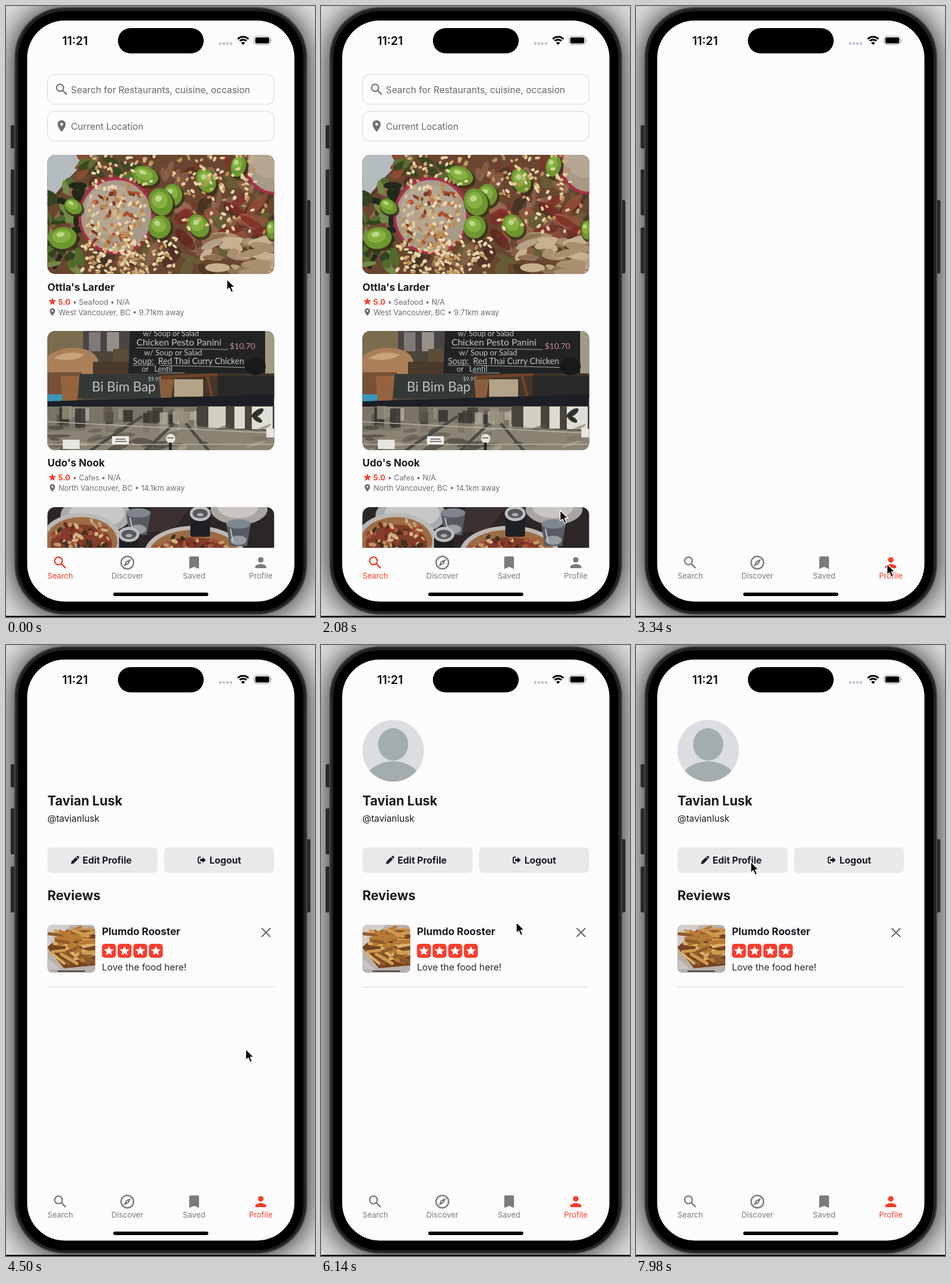
Animation, 533 px wide and 1051 px high, one loop 8 s. Source, as an HTML page:

```html
<!DOCTYPE html>
<html lang="en">
<head>
<meta charset="utf-8">
<title>Restaurant app</title>
<style>
  html, body { margin: 0; width: 100%; height: 100%; overflow: hidden; background: #dcdcda; }
  svg { display: block; width: 100vw; height: 100vh; }
  text { font-family: Inter, Roboto, sans-serif; white-space: pre; }
  .chalk { font-family: Lato, "Open Sans", sans-serif; }
</style>
</head>
<body>
<svg id="stage" viewBox="0 0 533 1051"></svg>
<script>
const DURATION = 8000, TAP = 3340, LOADED = 4180, AVATAR = 5900;
const INK = '#1b1a20', GREY = '#7b7a7d', RED = '#f53f2a', PAPER = '#fcfcfd';

let seed = 7;
const rand = (min = 0, max = 1) => {
  seed = (seed * 16807) % 2147483647;
  return min + (max - min) * seed / 2147483647;
};
const pick = list => list[Math.floor(rand(0, list.length))];
const repeat = (n, make) => Array.from({ length: n }, (_, i) => make(i)).join('');

const rect = (x, y, w, h, fill, r = 0, more = '') =>
  `<rect x="${x}" y="${y}" width="${w}" height="${h}" rx="${r}" fill="${fill}" ${more}/>`;
const oval = (x, y, rx, ry, fill, angle = 0, more = '') =>
  `<ellipse cx="${x}" cy="${y}" rx="${rx}" ry="${ry}" fill="${fill}" transform="rotate(${angle} ${x} ${y})" ${more}/>`;
const path = (d, fill, more = '') => `<path d="${d}" fill="${fill}" ${more}/>`;
const line = (d, color, width, more = '') =>
  path(d, 'none', `stroke="${color}" stroke-width="${width}" ${more}`);
const text = (x, y, size, fill, str, weight = 400, more = '') =>
  `<text x="${x}" y="${y}" font-size="${size}" fill="${fill}" font-weight="${weight}" ${more}>${str}</text>`;
const at = (x, y, scale, body) => `<g transform="translate(${x} ${y}) scale(${scale})">${body}</g>`;

const star = (x, y, r, fill) => {
  const points = Array.from({ length: 10 }, (_, i) => {
    const d = i % 2 ? r * 0.43 : r, a = i * Math.PI / 5;
    return `${(x + d * Math.sin(a)).toFixed(2)},${(y - d * Math.cos(a)).toFixed(2)}`;
  });
  return `<polygon points="${points.join(' ')}" fill="${fill}"/>`;
};

// Icons are centred on the origin of a 24 unit grid.
const icons = {
  search: c => `<circle cx="-2.5" cy="-2.5" r="5.5" fill="none" stroke="${c}" stroke-width="2"/>` +
    line('M1.6 1.6L7.8 7.8', c, 2.2),
  compass: c => `<circle r="9" fill="none" stroke="${c}" stroke-width="2"/>` +
    path('M5.5-5.5L2 2-5.5 5.5-2-2zM0-1.1a1.1 1.1 0 1 0 .01 0z', c, 'fill-rule="evenodd"'),
  bookmark: c => path('M-5-9H5Q7-9 7-7V9L0 6-7 9V-7Q-7-9-5-9z', c),
  person: c => `<circle cy="-4" r="4" fill="${c}"/>` + path('M-8 8V6C-8 3.3-2.7 2 0 2S8 3.3 8 6V8z', c),
  pin: c => path('M0-10C-3.9-10-7-6.9-7-3 -7 2.3 0 10 0 10S7 2.3 7-3C7-6.9 3.9-10 0-10zM0-5.5a2.5 2.5 0 1 0 .01 0z', c, 'fill-rule="evenodd"'),
  pencil: c => path('M-7 7L-6 2.4 1.5-5 5 -1.5-2.4 6zM2.4-5.8L4-7.2Q5-7.8 6-7L7-6Q7.8-5 7.2-4L5.8-2.4z', c),
  logout: c => line('M-1.5-5H-4Q-6-5-6-3V3Q-6 5-4 5H-1.5', c, 2) +
    path('M-2.5-2H1.5V-5.2L7.3 0 1.5 5.2V2H-2.5z', c)
};

function photo(id, x, y, w, h, r, body) {
  return `<clipPath id="${id}">${rect(x, y, w, h, '#000', r)}</clipPath><g clip-path="url(#${id})">${body}</g>`;
}

function bean(x, y, rx, ry, angle) {
  return oval(x + 2, y + 3, rx + 2, ry + 2, '#33301a', angle, 'opacity=".8"') + oval(x, y, rx, ry, '#6c962f', angle) +
    oval(x - 2, y - 3, rx * 0.68, ry * 0.6, '#86b040', angle) + oval(x - 4, y - 6, rx * 0.3, ry * 0.22, '#bcd88a', angle);
}

function salad() {
  const tones = ['#4b2c20', '#70402f', '#936450', '#3f3622', '#66643a', '#7d362c', '#a07a5c'];
  const radish = (x, y, rx, ry) =>
    oval(x, y, rx, ry, '#a89a88', 0, 'stroke="#a8304a" stroke-width="5"') + oval(x - 6, y - 10, rx * 0.75, ry * 0.68, '#b9ab98', 0, 'opacity=".7"');
  const seeds = (n, x0, x1, y0, y1) => repeat(n, () =>
    oval(rand(x0, x1), rand(y0, y1), rand(3, 4.8), rand(2, 3), pick(['#e3cda0', '#cfae78', '#ead9b4', '#b98d58']), rand(0, 180)));
  return rect(71, 256, 392, 206, '#68462f') +
    repeat(170, () => oval(rand(72, 462), rand(256, 461), rand(6, 22), rand(4, 11), pick(tones), rand(0, 180), 'opacity=".7"')) +
    repeat(22, () => oval(rand(300, 455), rand(330, 410), rand(12, 26), rand(6, 12), pick(['#7d2b25', '#97503f', '#a9705c', '#5d211b']), rand(-50, 50), 'opacity=".75"')) +
    path('M71 256H152Q120 282 100 306T71 340z', '#b5bcc0') +
    repeat(38, () => oval(rand(75, 130), rand(305, 455), rand(8, 18), rand(3, 8), pick(['#33431f', '#526a2b', '#20281a', '#768947']), rand(0, 180))) +
    repeat(14, () => oval(rand(115, 225), rand(260, 295), rand(9, 18), rand(4, 8), pick(['#3b4722', '#5b6b31', '#8c4a31']), rand(0, 180))) +
    repeat(45, () => oval(rand(345, 460), rand(395, 460), rand(10, 26), rand(4, 8), pick(['#a98f6f', '#c6b08f', '#8f7254', '#b3a283']), rand(-50, 30))) +
    radish(462, 270, 48, 52) + radish(190, 361, 63, 64) +
    bean(240, 292, 23, 16, 20) + bean(287, 325, 17, 19, 0) + bean(267, 337, 20, 24, -25) +
    bean(265, 380, 19, 20, 30) + bean(332, 378, 17, 21, -35) + bean(345, 300, 16, 22, -25) +
    bean(98, 399, 24, 19, -8) + bean(116, 345, 16, 12, 30) + bean(401, 275, 13, 19, 15) + bean(459, 385, 10, 16, 0) +
    repeat(55, () => oval(rand(140, 238), rand(315, 415), rand(3, 7), rand(2, 4), pick(['#a9512f', '#c27c4a', '#7f3a26']), rand(0, 180))) +
    seeds(90, 140, 240, 325, 418) + seeds(85, 130, 235, 410, 461) + seeds(75, 285, 430, 256, 330) +
    seeds(60, 200, 300, 395, 461) + seeds(45, 150, 260, 256, 315) + seeds(30, 300, 450, 330, 390);
}

function cafe() {
  const chalk = (x, y, size, str, color = '#c3c7c2') => text(x, y, size, color, str, 400, 'class="chalk"');
  return rect(71, 558, 392, 207, '#4b443a') + rect(71, 558, 62, 60, '#7b6c4e') +
    rect(133, 558, 80, 36, '#4a4545') + rect(143, 561, 20, 33, '#807a78') + rect(174, 561, 21, 33, '#958f87') +
    rect(185, 590, 28, 46, '#5c4d38') +
    path('M71 603Q95 584 128 589T160 620L150 634H71z', '#ab7f58') + path('M82 606Q106 590 136 600Q115 614 82 606z', '#c9a47b') +
    rect(71, 630, 60, 47, '#775038') + rect(150, 612, 63, 24, '#4a3a2b') + path('M94 636H128L122 680H98z', '#95643e') +
    path('M214 558H447L452 636L211 632z', '#212325') + rect(447, 558, 16, 80, '#a09a86') +
    chalk(236, 568, 13, 'w/ Soup or Salad') + chalk(225, 584, 16, 'Chicken Pesto Panini') +
    chalk(386, 590, 14, '$10.70', '#d08a9b') + chalk(238, 601, 13.5, 'w/ Soup or Salad') +
    chalk(219, 616, 14.5, 'Soup:  Red Thai Curry Chicken') + chalk(234, 629, 13, 'or   Lentil') +
    line('M225 588L383 591M219 618H257M265 618L424 622M262 631H308', '#a9aca8', 1) +
    rect(250, 632, 213, 43, '#43352a') + rect(290, 642, 50, 30, '#b3a387') +
    line('M240 640L365 634M284 638L273 674M347 636L356 674', '#6f4326', 5) +
    rect(365, 636, 98, 39, '#2a2727') + oval(430, 620, 18, 15, '#17191b') +
    path('M127 633H266L262 675H124z', '#343938') + chalk(148, 663, 23, 'Bi Bim Bap', '#bfc2bd') + chalk(245, 645, 9, '$9.95') +
    path('M264 642H290L285 674H267z', '#8a5f3e') + rect(71, 668, 26, 13, '#3a98bc') +
    path('M71 680L462 668V690H71z', '#1c1f26') +
    rect(71, 689, 392, 76, '#7a7568') +
    repeat(26, () => rect(rand(74, 330), rand(688, 704), rand(6, 18), rand(12, 40), pick(['#3d3a34', '#b5b09e', '#5c5749', '#99947f', '#2f2e2c']), 0, 'opacity=".8"')) +
    rect(330, 688, 133, 42, '#48443d') + rect(349, 689, 30, 38, '#d2d0c3') + rect(394, 689, 18, 38, '#dcdbd0') +
    rect(424, 689, 36, 39, '#deded6') + oval(434, 700, 12, 5, '#2e332b', -35) + oval(434, 711, 9, 4, '#303329', 30) +
    path('M71 733L210 715L462 732V765H71z', '#8f8977', 'opacity=".75"') +
    repeat(30, () => oval(rand(80, 455), rand(725, 762), rand(8, 24), rand(2, 6), pick(['#5d594d', '#b3ad9a', '#7b7464', '#403e39']), rand(-25, 10), 'opacity=".6"')) +
    line('M145 765L235 706M240 765L290 718M350 765L310 718', '#4b4b46', 5) +
    line('M71 715L462 735M71 754H462', '#bab5a4', 1.5) +
    rect(98, 746, 29, 16, '#e6e6e1') + rect(183, 740, 29, 14, '#f0f0eb') + rect(449, 727, 14, 15, '#e6e5df') +
    `<circle cx="284" cy="744" r="8" fill="#e6e4dc"/>` + rect(281, 751, 5, 14, '#26282a') +
    line('M189 745H206M188 749H208M278 743H289', '#53544f', 1.5);
}

function pizzas() {
  const tones = ['#c0986a', '#6b2c20', '#3c3122', '#a8563a', '#8a3a28', '#d2b184'];
  const pizza = (x, y, rx, ry) => oval(x, y - 1, rx + 8, ry + 6, '#bbb8b5') + oval(x, y, rx, ry, '#9b6c44') +
    oval(x, y + 5, rx - 9, ry - 8, '#823c2a') +
    repeat(70, () => {
      const a = rand(0, Math.PI * 2), d = rand(0.1, 0.95);
      return oval(x + d * rx * Math.cos(a), y + d * ry * Math.sin(a), rand(3, 8), rand(2, 4), pick(tones), rand(0, 180));
    });
  const can = (x, y) => rect(x - 17, y, 34, 40, '#1f2023', 4) + oval(x, y, 18, 13, '#bcbdc0') +
    oval(x, y, 13, 8, '#55575a') + oval(x, y + 2, 6, 3, '#a9abae');
  const glass = (x, y) => path(`M${x - 21} ${y - 18}H${x + 21}L${x + 15} ${y + 20}H${x - 15}z`, '#565c62') +
    oval(x, y - 18, 21, 8, '#7e868c') + oval(x, y + 10, 14, 8, '#989fa3') +
    line(`M${x - 14} ${y - 10}L${x - 9} ${y + 14}`, '#c3c9ca', 2);
  return rect(71, 861, 392, 100, '#2c2627') + path('M250 861H320L285 905H240z', '#3d3031') +
    oval(155, 876, 61, 32, '#a9aaac') + oval(157, 873, 48, 24, '#c6c7c7') +
    oval(402, 866, 49, 26, '#a9a6a2') + oval(400, 862, 35, 19, '#c9c6c1') +
    pizza(130, 921, 62, 42) + pizza(325, 942, 78, 41) + glass(228, 890) + can(212, 909) + can(335, 873) + glass(401, 909);
}

function fries() {
  return rect(71, 481, 84, 83, '#bab0aa') + path('M71 481H112L86 507L71 522z', '#d4cecb') +
    path('M71 520L105 490L154 498V551L100 556z', '#754520') +
    repeat(46, () => {
      const x = rand(74, 138), y = rand(489, 542), a = rand(-0.4, 0.8), len = rand(17, 34);
      return line(`M${x} ${y}l${len * Math.cos(a)} ${len * Math.sin(a)}`, pick(['#b67a34', '#cf9a50', '#dcb069', '#8f5c2c']), rand(4, 7), 'stroke-linecap="round"');
    }) + path('M71 538L100 563H71z', '#c8c2c2') + rect(71, 558, 84, 6, '#b7b0ae') + rect(89, 560, 47, 2, '#3d3532');
}

function field(y, icon, label) {
  return rect(71.5, y, 391, 51, PAPER, 12, 'stroke="#d4d4d6" stroke-width="1"') +
    at(96, y + 25.5, icon === 'search' ? 1.1 : 1, icons[icon]('#716e76')) + text(112, y + 32, 15.8, '#69666f', label);
}

function listing(y, name, kind, place) {
  return text(71.5, y, 17.5, INK, name, 700) + star(80, y + 19, 7, RED) +
    text(90, y + 24, 13.3, RED, '5.0', 700) + text(115, y + 24, 12.8, '#706d70', `• ${kind} • N/A`) +
    at(80, y + 37, 0.66, icons.pin('#706d70')) + text(90.5, y + 42, 12.95, '#706d70', place);
}

function feed() {
  return field(118, 'search', 'Search for Restaurants, cuisine, occasion') + field(181, 'pin', 'Current Location') +
    photo('dish', 71.5, 256, 391, 205, 13, salad()) +
    listing(489.5, "Ottla's Larder", 'Seafood', 'West Vancouver, BC • 9.71km away') +
    photo('counter', 71.5, 559, 391, 205, 13, cafe()) +
    listing(792, "Udo's Nook", 'Cafes', 'North Vancouver, BC • 14.1km away') +
    photo('table', 71.5, 862, 391, 100, 13, pizzas()) + rect(60, 932, 415, 55, PAPER);
}

function profile() {
  const button = (x, icon, iconX, label, labelX) => rect(x, 348, 190, 44, '#e9e8ea', 8) +
    at(iconX, 370, 0.98, icons[icon](INK)) + text(labelX, 376, 16, INK, label, 700);
  return text(71.5, 276, 22.3, INK, 'Tavian Lusk', 700) + text(71.5, 304, 15.7, INK, '@tavianlusk') +
    button(71.5, 'pencil', 119, 'Edit Profile', 132) + button(272.5, 'logout', 337.5, 'Logout', 351) +
    text(71.5, 439, 22.4, INK, 'Reviews', 700) +
    photo('meal', 71.5, 481.5, 82.5, 82, 8, fries()) +
    text(165.5, 499, 17.5, INK, 'Plumdo Rooster', 700) +
    repeat(4, i => rect(165.5 + i * 27, 514, 24, 24, '#fa3d2d', 5) + star(177.5 + i * 27, 526.5, 9, '#fff')) +
    text(165.5, 559.5, 15.9, '#2b292e', 'Love the food here!') +
    line('M441 487L456 502M456 487L441 502', '#6c6a6e', 2.3) + rect(71.5, 587.5, 391, 1, '#d4d3d8');
}

function avatar() {
  return photo('face', 71.5, 129, 106, 106, 53, rect(71, 129, 107, 107, '#dcdde1') +
    oval(124.5, 171, 26, 28, '#a4adad') + oval(124.5, 236, 48, 36, '#a4adad'));
}

function tabs(active) {
  const items = [['Search', 'search', 93.5], ['Discover', 'compass', 209.3], ['Saved', 'bookmark', 324.5], ['Profile', 'person', 439.5]];
  return items.map(([label, icon, x]) => {
    const color = label === active ? RED : GREY;
    return at(x, 957.5, 1.2, icons[icon](color)) + text(x, 985, 13.3, color, label, 400, 'text-anchor="middle"');
  }).join('');
}

function phone() {
  return `<filter id="soft" x="-30%" y="-30%" width="160%" height="160%"><feGaussianBlur stdDeviation="25"/></filter>` +
    rect(0, 0, 533, 1051, '#dcdcda') + rect(15, 3, 504, 1045, '#000', 84, 'opacity=".9" filter="url(#soft)"') +
    [[8, 205, 40], [8, 281, 79], [8, 381, 79], [514, 334, 126]].map(([x, y, h]) => rect(x, y, 11, h, '#29292c', 2)).join('') +
    rect(14.5, 2, 505, 1045, '#48484b', 86) + rect(16.5, 4, 501, 1041, '#222224', 84) +
    rect(21, 9, 492, 1032, '#000', 80) + rect(36.5, 25, 461, 999.5, PAPER, 64.5) +
    rect(0, 1049, 533, 2, '#000');
}

function statusBar() {
  const arc = r => {
    const d = r * Math.SQRT1_2;
    return line(`M${409 - d} ${66 - d}A${r} ${r} 0 0 1 ${409 + d} ${66 - d}`, '#000', 3.2);
  };
  return text(97, 66.5, 20, '#08080a', '11:21', 600) + rect(193, 38, 148, 43.5, '#000', 21.75) +
    repeat(4, i => rect(367.5 + i * 6.2, 62.5, 4, 4, '#bcb9c9', 1)) +
    arc(13) + arc(8.2) + path('M409 67L405.6 63.2Q409 60.6 412.4 63.2z', '#000') +
    rect(428, 52, 28, 14.5, 'none', 4.5, 'stroke="#9a999e" stroke-width="1.2"') + rect(430, 54, 24, 10.5, '#000', 2.8) +
    path('M457.5 57Q460 59.2 457.5 61.6z', '#9a999e');
}

const pointer = path('M0 0V18.7L4.3 14.8 7.6 22.4 10.9 21 7.7 13.5H13.6z', '#000',
  'stroke="#fff" stroke-width="1.3" stroke-linejoin="round"');

const stage = document.getElementById('stage');
stage.innerHTML = phone() + statusBar() +
  `<g id="feed">${feed()}${tabs('Search')}</g><g id="account">${tabs('Profile')}</g>` +
  `<g id="details">${profile()}</g><g id="avatar">${avatar()}</g>` +
  rect(185, 1009, 164, 6, '#000', 3) + `<g id="cursor">${pointer}</g>`;

// Cursor stops: time, x, y
const route = [
  [0, 381, 470], [820, 382, 510], [1380, 388, 705], [1560, 391, 750], [1660, 392, 756],
  [2400, 428, 952], [2520, 428, 959], [2660, 429, 959], [2820, 433, 960], [TAP, 433, 960],
  [5020, 405, 577], [5860, 366, 512], [6140, 337, 477], [6600, 309, 456], [6700, 308, 455],
  [7280, 231, 402], [7420, 231, 402], [7980, 198, 373], [DURATION, 198, 373]
];

function cursorAt(t) {
  const i = route.findIndex(([end]) => end > t);
  const [t0, x0, y0] = route[i - 1], [t1, x1, y1] = route[i];
  const k = (t - t0) / (t1 - t0);
  return [x0 + (x1 - x0) * k, y0 + (y1 - y0) * k];
}

const parts = Object.fromEntries(['feed', 'account', 'details', 'avatar', 'cursor']
  .map(id => [id, stage.querySelector(`g#${id}`)]));
const show = (part, on) => part.setAttribute('display', on ? 'inline' : 'none');

function render(t) {
  show(parts.feed, t < TAP);
  show(parts.account, t >= TAP);
  show(parts.details, t >= LOADED);
  show(parts.avatar, t >= AVATAR);
  parts.cursor.setAttribute('transform', `translate(${cursorAt(t)})`);
}

const start = performance.now();
function tick(now) {
  render(Math.max(0, now - start) % DURATION);
  requestAnimationFrame(tick);
}
render(0);
requestAnimationFrame(tick);
</script>
</body>
</html>
```
